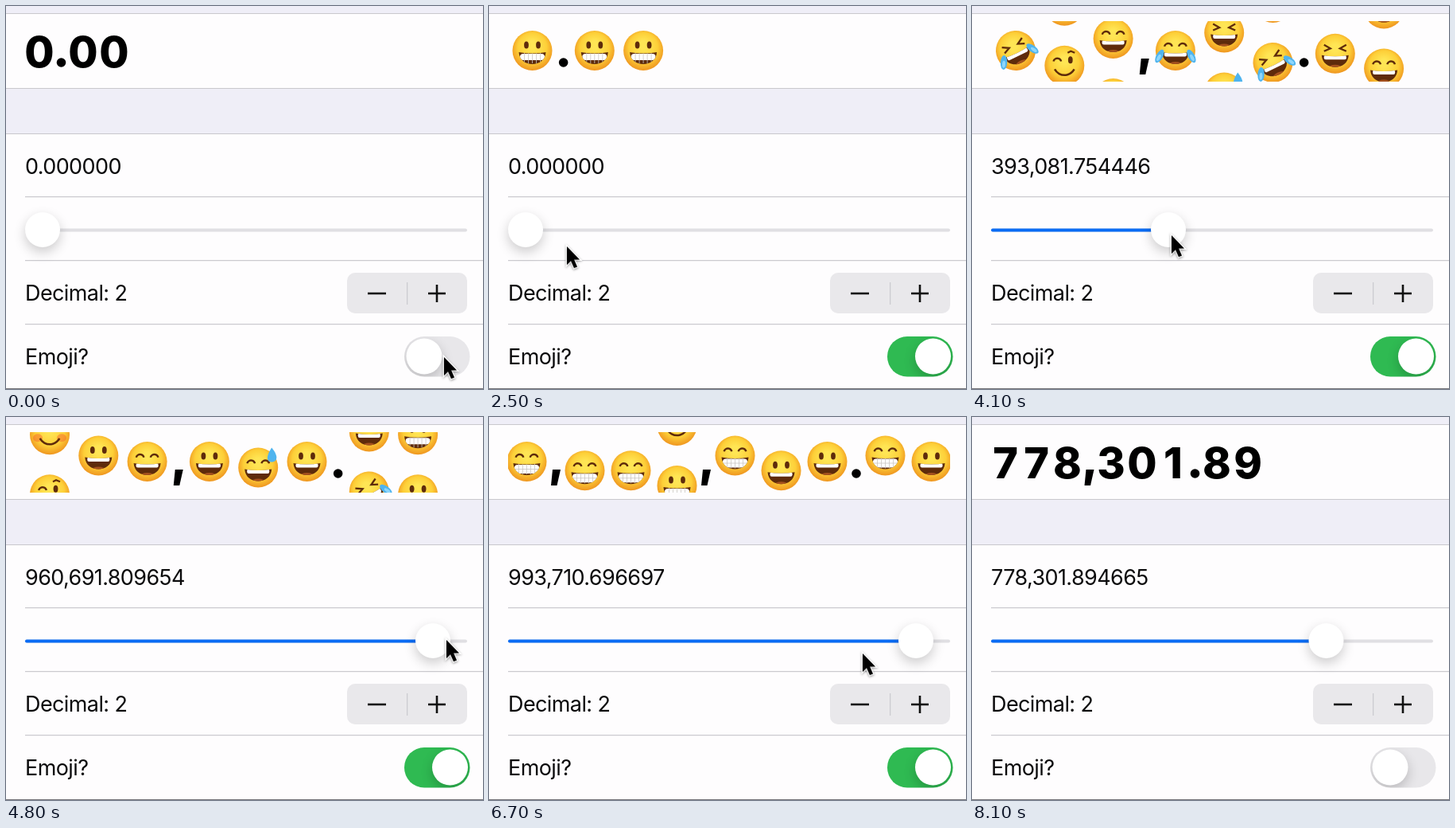
An HTML page with a canvas for the animation above (8800 ms loop, 600 by 481 pixels).

```html
<!DOCTYPE html>
<html lang="en">
<head>
<meta charset="utf-8">
<title>Rolling emoji counter</title>
<style>
html, body { margin: 0; width: 100%; height: 100%; overflow: hidden; background: #fff; }
canvas { display: block; }
</style>
</head>
<body>
<canvas id="stage" width="600" height="481"></canvas>
<script>
const c = document.getElementById('stage').getContext('2d');
const LOOP = 8800, STEP = 100;
const FONT = 'Inter, "Liberation Sans", sans-serif';
const BROWN = '#5e2b0b', TEAR = '#4fb4ee';
const lerp = (a, b, u) => a + (b - a) * u;

// Keys are rows of [time in s, values...], joined by straight lines.
const CURSOR = [
  [0, 550, 439], [.2, 550, 439], [.6, 546, 437], [1.1, 545, 436], [1.7, 536, 428], [1.9, 515, 415],
  [2.2, 280, 345], [2.5, 97, 300], [2.7, 56, 287], [2.9, 49, 284], [4.1, 250, 286], [4.8, 553, 278],
  [6, 551, 281], [6.4, 558, 285], [6.7, 469, 295], [7, 446, 293], [7.2, 455, 305], [7.5, 540, 425], [7.7, 547, 438]
];
const THUMB = [[2.9, 46], [4.1, 247], [4.8, 537], [6, 552], [6.3, 557], [6.5, 557], [6.7, 537], [7, 445.5]];
const VALUE = [
  [2.9, 0], [4.1, 393081.754446], [4.8, 960691.809654], [6, 992138.385773],
  [6.2, 1e6], [6.6, 1e6], [6.7, 993710.696697], [7.1, 778301.894665]
];
const SWITCH = [[.5, 0], [.8, 1], [7.7, 1], [7.9, 0]];
const EMOJI = [[.6, 0], [1, 1], [7.7, 1], [8.1, 0]];
const LAYOUT = [[2.9, 0], [3.3, 1], [5.9, 1], [6, 1.2], [6.3, 2], [6.8, 2], [7.1, 1]];
const ROLL = [
  [2.9, 0, 0, 0, 0, 0, 0, 0, 0, 0],
  [4.1, 0, 6, 8.75, 2.2, 7, 4.3, 5.8, 3.95, 1.7],
  [4.8, 0, 8.45, 1.1, 2, 1, 4.9, 1, 5.5, .45],
  [6, 1, 4.1, 4.1, 1.15, 7.3, 2.1, 2.45, 7.05, 1.65],
  [6.7, 3, 2.85, 2.85, -.4, 3.1, .85, 1, 3.1, 1],
  [7.2, 0, 7, 7, 8, 3, 0, 1, 8, 9]
];

function at(keys, t) {
  const i = keys.findIndex(k => k[0] > t);
  if (i === 0) return keys[0].slice(1);
  if (i < 0) return keys[keys.length - 1].slice(1);
  const a = keys[i - 1], b = keys[i], u = (t - a[0]) / (b[0] - a[0]);
  return a.slice(1).map((v, j) => lerp(v, b[j + 1], u));
}

// Centres of every glyph in the pattern when item `first` is the leading one.
const PATTERN = '0,000,000.00';
function layout(first, x0, pitch, gap) {
  const xs = [];
  let x = x0;
  for (let i = first; i < PATTERN.length; i++) {
    if (PATTERN[i] === '0') { xs[i] = x; x += pitch; }
    else { xs[i] = x - pitch / 2 + gap / 2; x += gap; }
  }
  x = x0;
  for (let i = first - 1; i >= 0; i--) xs[i] = PATTERN[i] === '0' ? x -= pitch : x + 18;
  return xs;
}
const FIRST = [8, 2, 0];
const TEXT_X = FIRST.map(f => layout(f, 42, 39, 16));
const EMOJI_X = [layout(8, 54.5, 61.3, 17), layout(2, 55, 61.3, 17), layout(0, 47.5, 58, 15)];

function rect(x, y, w, h, color, r = 0) {
  c.fillStyle = color;
  c.beginPath();
  c.roundRect(x, y, w, h, r);
  c.fill();
}

function ellipse(x, y, rx, ry, color, angle = 0) {
  c.fillStyle = color;
  c.beginPath();
  c.ellipse(x, y, rx, ry, angle, 0, 7);
  c.fill();
}

function stroke(color, width, ...points) {
  c.strokeStyle = color;
  c.lineWidth = width;
  c.beginPath();
  points.forEach(([x, y]) => c.lineTo(x, y));
  c.stroke();
}

function arc(x, y, r, from, to, width = 2.4) {
  c.strokeStyle = BROWN;
  c.lineWidth = width;
  c.beginPath();
  c.arc(x, y, r, from, to);
  c.stroke();
}

function knob(x, y, r) {
  c.save();
  c.shadowColor = 'rgba(0,0,0,.2)';
  c.shadowBlur = 15;
  c.shadowOffsetY = 6;
  ellipse(x, y, r, r, '#fff');
  c.restore();
}

// Eyes: o open, ^ smiling, > squeezed, w winking. Mouths: g grin, t full teeth, m open, s smile.
const FACES = ['og', 'om', '^m', '^t', '>m', '^m', '>m', '^m', '^s', 'ws'];

function eyes(kind) {
  for (const s of [-1, 1]) {
    if (kind === 'o' || (kind === 'w' && s > 0)) ellipse(s * 7.5, -7, 2.9, 4.6, BROWN);
    else if (kind === '>') stroke(BROWN, 2.3, [s * 14, -11], [s * 6, -6.5], [s * 14, -3]);
    else arc(s * 9, -4, 5, Math.PI * 1.08, Math.PI * 1.92);
  }
}

function mouth(kind) {
  if (kind === 's') return arc(0, -2, 14, .5, Math.PI - .5, 2.5);
  c.save();
  c.beginPath();
  c.moveTo(-17, 2);
  c.quadraticCurveTo(0, 5, 17, 2);
  c.bezierCurveTo(16, 22, -16, 22, -17, 2);
  c.closePath();
  c.fillStyle = BROWN;
  c.fill();
  c.clip();
  if (kind === 'm') {
    rect(-14, 2, 28, 5.5, '#fff', 2);
    ellipse(0, 18, 9, 4, '#a4501e');
  } else {
    rect(-15.5, 4, 31, kind === 't' ? 11 : 8, '#fff', 4);
    for (let x = -10; x <= 10; x += 5) stroke('#c9c6c2', .8, [x, 3], [x, 16]);
    if (kind === 't') stroke('#c9c6c2', .8, [-16, 9.5], [16, 9.5]);
  }
  c.restore();
}

function face(d, x, y) {
  c.save();
  c.translate(x, y);
  if (d === 6) c.rotate(-.45);
  const skin = c.createRadialGradient(0, -7, 5, 0, -2, 27);
  skin.addColorStop(0, '#ffe554');
  skin.addColorStop(.6, '#fdcf38');
  skin.addColorStop(1, '#ef9620');
  ellipse(0, 0, 25, 25, skin);
  if (d === 8) for (const s of [-1, 1]) ellipse(s * 15, 4, 6, 5, 'rgba(244,92,44,.45)');
  const [eye, lips] = FACES[d];
  eyes(eye);
  mouth(lips);
  if (d === 9) stroke(BROWN, 2.2, [4, -16], [8, -18], [13, -16]);
  if (d === 5) {
    c.fillStyle = TEAR;
    c.beginPath();
    c.moveTo(17, -25);
    c.bezierCurveTo(27, -13, 23, -7, 17, -7);
    c.bezierCurveTo(11, -7, 9, -13, 17, -25);
    c.fill();
  }
  if (d === 6 || d === 7) {
    for (const s of [-1, 1]) {
      ellipse(s * 20, 7, 4.2, 9, TEAR, s * -.5);
      ellipse(s * 21, 9, 2, 4.5, '#8ed6fb', s * -.5);
    }
  }
  c.restore();
}

function separator(kind, x) {
  if (kind === '.') return ellipse(x, 71, 5.8, 5.8, '#000');
  c.fillStyle = '#000';
  c.beginPath();
  c.moveTo(x - 4, 66);
  c.lineTo(x + 6, 66);
  c.lineTo(x + 1.5, 86);
  c.lineTo(x - 6, 86);
  c.fill();
}

function display(t) {
  const [s] = at(LAYOUT, t), [e] = at(EMOJI, t), roll = at(ROLL, t);
  const stage = Math.min(1, Math.floor(s)), u = s - stage;
  const place = (xs, i) => lerp(xs[stage][i], xs[stage + 1][i], u);
  const xs = [...PATTERN].map((_, i) => lerp(place(TEXT_X, i), place(EMOJI_X, i), e));
  const shown = FIRST[Math.ceil(s)];

  c.save();
  c.beginPath();
  c.rect(24, 19, 556, 76);
  c.clip();
  [...PATTERN].forEach((kind, i) => {
    if (kind !== '0' && i >= shown) separator(kind, xs[i]);
  });
  c.font = `800 54px ${FONT}`;
  c.textAlign = 'center';
  c.letterSpacing = '0px';
  let col = 0;
  [...PATTERN].forEach((kind, i) => {
    if (kind !== '0') return;
    const p = roll[col++];
    if (i < shown) return;
    c.globalAlpha = 1 - e;
    c.fillStyle = '#000';
    if (e < 1) c.fillText((Math.round(p) + 10) % 10, xs[i], 77);
    c.globalAlpha = e;
    if (e > 0) {
      for (let k = Math.floor(p) - 1; k <= p + 2; k++) face((k + 10) % 10, xs[i], 56 + (k - p) * 75);
    }
  });
  c.restore();
}

function label(text, y) {
  c.font = `400 27px ${FONT}`;
  c.letterSpacing = '-0.6px';
  c.textAlign = 'left';
  c.fillStyle = '#0b0b0c';
  c.fillText(text, 24, y);
}

function slider(x) {
  rect(24, 279.5, 556, 4, '#e0dfe3', 2);
  if (x > 46) rect(24, 279.5, x - 24, 4, '#0a6cf5', 2);
  knob(x, 281, 22);
}

function stepper() {
  rect(429, 335, 151, 51, '#e9e8eb', 10);
  rect(504, 347, 1.3, 28, '#cccbd0');
  stroke('#111', 2.6, [455, 361], [478, 361]);
  stroke('#111', 2.6, [531, 361], [553, 361]);
  stroke('#111', 2.6, [542, 350], [542, 372]);
}

function toggle(u) {
  const mix = [[232, 47], [231, 186], [234, 82]].map(([a, b]) => lerp(a, b, u));
  c.save();
  c.beginPath();
  c.roundRect(501, 415, 82.5, 50.5, 25);
  c.clip();
  rect(501, 415, 83, 51, `rgb(${mix})`);
  knob(lerp(526, 558.5, u), 440, 22.5);
  c.restore();
}

function cursor([x, y]) {
  c.save();
  c.translate(x, y);
  c.shadowColor = 'rgba(0,0,0,.3)';
  c.shadowBlur = 3;
  c.shadowOffsetY = 1;
  c.beginPath();
  [[1, 2], [1, 25], [6, 20], [10, 29], [14, 27.5], [10, 18.5], [17, 18.5]].forEach(p => c.lineTo(...p));
  c.closePath();
  c.strokeStyle = '#fff';
  c.lineWidth = 3;
  c.stroke();
  c.fillStyle = '#000';
  c.fill();
  c.restore();
}

function draw(t) {
  rect(0, 0, 600, 481, '#fefdfe');
  rect(0, 0, 600, 9, '#efeef7');
  rect(0, 104, 600, 57, '#efeef7');
  for (const y of [9, 103, 160]) rect(0, y, 600, 1, '#c9c8cd');
  for (const y of [239, 319, 399]) rect(24, y, 576, 1.2, '#cbcacf');
  rect(0, 480, 600, 1, '#77767a');

  display(t);
  const [value] = at(VALUE, t);
  label(value.toLocaleString('en-US', { minimumFractionDigits: 6, maximumFractionDigits: 6 }), 211);
  slider(at(THUMB, t)[0]);
  label('Decimal: 2', 370);
  stepper();
  label('Emoji?', 450);
  toggle(at(SWITCH, t)[0]);
  if (t < 8.1) cursor(at(CURSOR, t));
}

const start = performance.now();
function tick() {
  const ms = (performance.now() - start) % LOOP;
  draw(Math.floor(ms / STEP) * STEP / 1000);
  requestAnimationFrame(tick);
}
tick();
</script>
</body>
</html>
```
